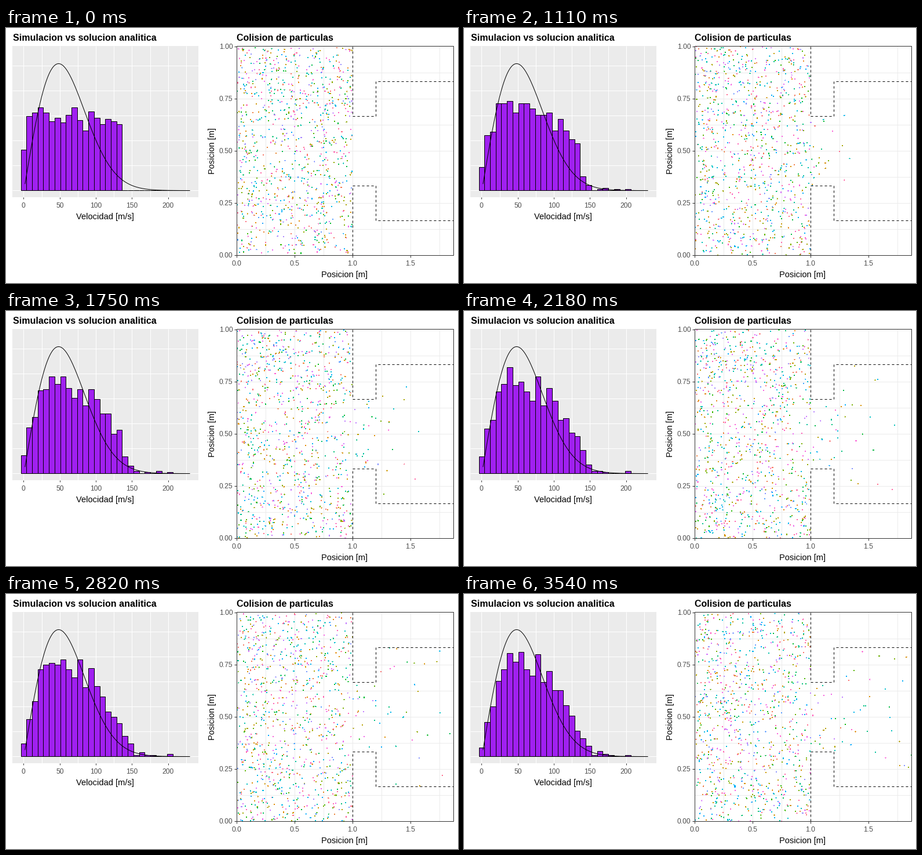
A matplotlib script that plays this animation: 780x440 px, repeating every 3570 ms.

```python
import numpy as np
import matplotlib.pyplot as plt
from matplotlib.animation import FuncAnimation
from matplotlib.patches import Rectangle

PX = 0.9                      # points per pixel at 80 dpi
FRAMES, INTERVAL = 102, 35
STEPS, STEP_MS = 100, 35.7
COUNT = 1000                  # particles
TOP_SPEED = 136               # m/s
DT = 1.25e-4                  # seconds per step
REACH = 0.004                 # collision distance
BASE, BIN, BINS = 280, 9.72, 30
BIN_SPEED = 7.78              # m/s per bar
COUNT_PX = 2.2                # bar height of one particle

rng = np.random.default_rng(12)


# ---------- particles ----------
def inside(x, y):
    off = abs(y - 0.5)
    room = (x > 0) & (x < 1) & (off < 1 / 2)
    throat = (x >= 1) & (x < 1.2) & (off < 1 / 6)
    nozzle = (x >= 1.2) & (off < 1 / 3)
    return room | throat | nozzle


def collide(pos, vel):
    dx = pos[:, None, 0] - pos[None, :, 0]
    dy = pos[:, None, 1] - pos[None, :, 1]
    near = np.triu(dx * dx + dy * dy < REACH ** 2, 1)
    for i, j in zip(*np.nonzero(near)):
        n = pos[i] - pos[j]
        n = n / (np.hypot(*n) + 1e-12)
        closing = (vel[i] - vel[j]) @ n
        if closing < 0:
            vel[i] -= closing * n
            vel[j] += closing * n


def simulate():
    """Positions and speeds of all particles at every step."""
    pos = rng.uniform(0.003, 0.997, (COUNT, 2))
    speed = rng.uniform(0, TOP_SPEED, COUNT)
    angle = rng.uniform(0, 2 * np.pi, COUNT)
    vel = np.column_stack([speed * np.cos(angle), speed * np.sin(angle)])
    path, speeds = [pos], [speed]
    for _ in range(STEPS - 1):
        new = pos + vel * DT
        hit = ~inside(new[:, 0], new[:, 1])
        side = hit & inside(pos[:, 0], new[:, 1])
        flat = hit & ~side & inside(new[:, 0], pos[:, 1])
        corner = hit & ~side & ~flat
        for axis, mask in ((0, side | corner), (1, flat | corner)):
            vel[mask, axis] *= -1
            new[mask, axis] = pos[mask, axis]
        pos = new
        collide(pos, vel)
        path.append(pos)
        speeds.append(np.hypot(vel[:, 0], vel[:, 1]))
    return np.array(path), np.array(speeds)


def bar_heights(speeds):
    edges = (np.arange(BINS + 1) - 0.5) * BIN_SPEED
    return np.round([COUNT_PX * np.histogram(s, edges)[0] for s in speeds])


def hue_colors(n, chroma=100, lum=65):
    """Evenly spaced hues in polar LUV."""
    h = np.radians(np.linspace(15, 375, n, endpoint=False))
    u = chroma * np.cos(h) / (13 * lum) + 0.1978
    v = chroma * np.sin(h) / (13 * lum) + 0.4683
    y = np.full(n, ((lum + 16) / 116) ** 3)
    xyz = np.array([y * 9 * u / (4 * v), y, y * (12 - 3 * u - 20 * v) / (4 * v)])
    to_rgb = np.array([[3.2406, -1.5372, -0.4986],
                       [-0.9689, 1.8758, 0.0415],
                       [0.0557, -0.2040, 1.0570]])
    lin = np.clip(to_rgb @ xyz, 0, 1)
    rgb = np.where(lin > 0.0031308, 1.055 * lin ** (1 / 2.4) - 0.055, 12.92 * lin)
    return rgb.T


# ---------- stage, in pixels with y downwards ----------
fig = plt.figure(figsize=(9.75, 5.5), dpi=80, facecolor="white")
ax = fig.add_axes([0, 0, 1, 1])
ax.set_xlim(0, 780)
ax.set_ylim(440, 0)
ax.axis("off")


def line(xs, ys, color, z, **kw):
    ax.plot(xs, ys, color=color, lw=PX, zorder=z, solid_capstyle="butt",
            dash_capstyle="butt", **kw)


def vline(x, y0, y1, color, z=1):
    line([x, x], [y0, y1], color, z, snap=True)


def hline(y, x0, x1, color, z=1):
    line([x0, x1], [y, y], color, z, snap=True)


def label(x, y, s, size, color="black", ha="center", **kw):
    ax.text(x, y, s, fontsize=size * PX, color=color, ha=ha, va="baseline",
            family="Liberation Sans", zorder=9, **kw)


def tick_label(x, y, s, ha="center"):
    label(x, y, s, 12, "#4D4D4D", ha)


GRID, DARK = "#EBEBEB", "#333333"


# left panel
def speed_px(v):
    return 30.9 + 1.247 * v


ax.add_patch(Rectangle((11, 31), 321, 261, fc=GRID, lw=0, zorder=0))
for v in range(0, 226, 25):
    vline(int(speed_px(v)), 31, 292, "white")
for k in range(6):
    hline(BASE - 43 * k, 11, 332, "white")
for v in range(0, 201, 50):
    x = int(speed_px(v))
    vline(x, 292, 295, DARK)
    tick_label(x, 310, str(v))
label(12, 22, "Simulacion vs solucion analitica", 16, ha="left", weight="bold")
label(171, 330, "Velocidad [m/s]", 14.67)

bars = [ax.add_patch(Rectangle((25.5 + BIN * k, BASE), BIN, 0, fc="#A020F0",
                               ec="black", lw=PX, zorder=3)) for k in range(BINS)]
v = np.linspace(1.5, 229.5, 300)
r = v / 48
line(speed_px(v), BASE + 0.5 - 219 * r * np.exp((1 - r * r) / 2), "black", 4)


# right panel
def px(x):
    return 398 + 200 * x


def py(y):
    return 392 - 360 * y


for k in range(1, 8):
    vline(px(k / 4), 31, 392, GRID)
    hline(py(k / 8), 398, 772, GRID)
for k in range(4):
    vline(px(k / 2), 392, 396, DARK)
    tick_label(px(k / 2), 410, f"{k / 2:.1f}")
for k in range(5):
    hline(py(k / 4), 394, 398, DARK)
    tick_label(391.5, py(k / 4) + 4.5, f"{k / 4:.2f}", "right")
label(398, 22, "Colision de particulas", 16, ha="left", weight="bold")
label(584.5, 430, "Posicion [m]", 14.67)
label(360, 212, "Posicion [m]", 14.67, rotation=90, rotation_mode="anchor")

for wall, mid, mouth in ((32, 152, 92), (392, 272, 332)):
    line([598, 598, 638, 638, 772], [wall, mid, mid, mouth, mouth], "black", 6,
         linestyle=(0, (4, 4)), snap=True)
ax.add_patch(Rectangle((398, 31), 374, 361, fill=False, ec=DARK, lw=PX, zorder=7))

path, speeds = simulate()
heights = bar_heights(speeds)
colors = hue_colors(COUNT)
rng.shuffle(colors)
dots = ax.scatter(px(path[0, :, 0]), py(path[0, :, 1]), s=(1.2 * PX) ** 2, c=colors,
                  marker="o", linewidths=0, antialiased=False, zorder=5)
dots.set_clip_path(Rectangle((398, 31), 374, 361, transform=ax.transData))


def update(i):
    step = min(int((INTERVAL * i + 28) / STEP_MS), STEPS - 1)
    dots.set_offsets(np.column_stack([px(path[step, :, 0]), py(path[step, :, 1])]))
    for bar, h in zip(bars, heights[step]):
        bar.set_height(-h)
    return [dots, *bars]


anim = FuncAnimation(fig, update, frames=FRAMES, interval=INTERVAL,
                     init_func=lambda: update(0), repeat=True, repeat_delay=0,
                     blit=False)
plt.show()
```
